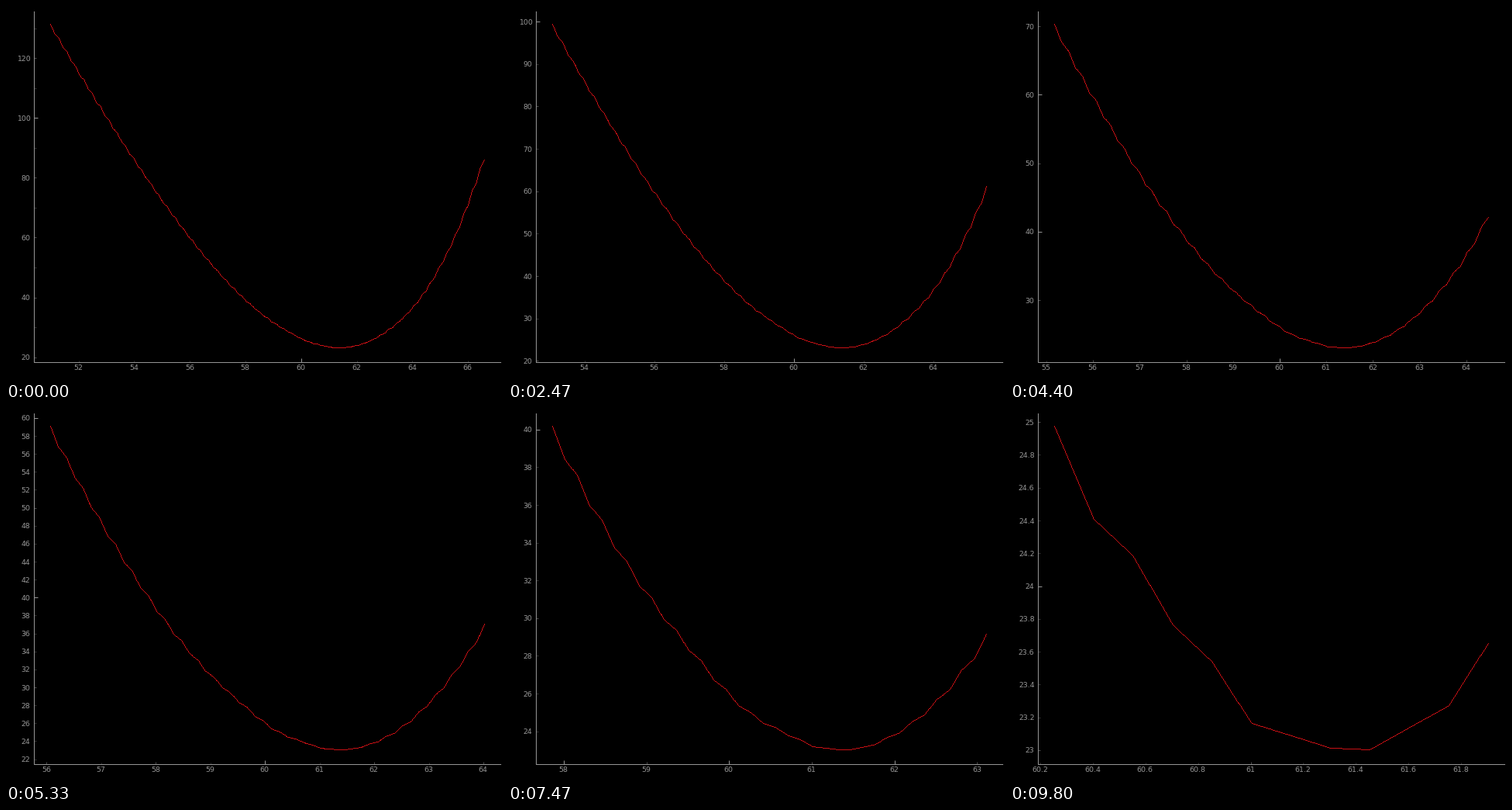
A matplotlib script for the animation above (9.87 s loop, 640 by 482 pixels).

```python
import math

import matplotlib.pyplot as plt
import numpy as np
from matplotlib.animation import FuncAnimation
from matplotlib.collections import LineCollection

W, H, DPI = 640, 482, 100
LOOP_MS, INTERVAL = 9870, 30
PX = 72 / DPI  # one pixel in points

# view box and the area the curve fills inside it, in pixels
LEFT, RIGHT, TOP, BOTTOM = 36, 638, 7, 459
CURVE_L, CURVE_R, CURVE_T, CURVE_B = 57, 617, 24.5, 441

GREY = 150 / 255
CURVE_COLOR = "#c81014"

# the valley shape, given by a few points
KNOTS = np.array([
    (50.9, 131.1), (53.0, 99.2), (54.2, 82.2), (56.0, 59.0), (57.2, 45.8),
    (58.7, 33.0), (59.5, 28.26), (60.2, 24.97), (60.7, 23.76), (61.0, 23.16),
    (61.2, 23.05), (61.4, 23.0), (61.9, 23.65), (62.6, 26.15), (63.4, 31.4),
    (64.0, 37.0), (64.9, 49.7), (65.5, 61.0), (66.5, 85.7),
]).T


def smooth(x):
    """Cubic Hermite curve through the knots."""
    kx, ky = KNOTS
    slope = np.gradient(ky, kx)
    i = np.clip(np.searchsorted(kx, x, side="right") - 1, 0, len(kx) - 2)
    h = kx[i + 1] - kx[i]
    t = (x - kx[i]) / h
    blend = t * t * (3 - 2 * t)
    bend = t * (1 - t) * ((1 - t) * slope[i] - t * slope[i + 1])
    return ky[i] + (ky[i + 1] - ky[i]) * blend + h * bend


# heights are read at x cut to one decimal, which makes the line uneven
X = 50.95 + 0.15 * np.arange(105)
Y = smooth(np.floor(X * 10 + 1e-6) / 10)


def step_at(ms):
    """Steps done so far; the pace drifts slightly over the loop."""
    pace = np.interp(ms, [0, 330, 2520, 6510, 9750], [0, 1, 8, 21, 31])
    return int(pace + 1e-6)


def tick_levels(lo, hi, size):
    """Tick values for the coarse, middle and fine spacing."""
    span = hi - lo
    best = span / math.log(size)
    unit = 10 ** math.floor(math.log10(best))
    steps = [unit * k for k in (1, 2, 10, 20, 100)]
    i = 0
    while steps[i + 1] <= best:
        i += 1
    spacings = [steps[i + 2], steps[i + 1]]
    if span / steps[i] <= 21:
        spacings.append(steps[i])
    seen, levels = set(), []
    for s in spacings:
        ks = range(math.ceil(lo / s), math.floor(hi / s) + 1)
        values = [v for v in (round(k * s, 6) for k in ks) if v not in seen]
        seen.update(values)
        levels.append(values)
    return levels


def visible_labels(levels, size, extent):
    """Add labels level by level until the axis gets too crowded."""
    shown = []
    for i, values in enumerate(levels):
        limit = 0.8 - 0.2 * min(len(shown) // 2, 3)
        fill = sum(extent(f"{v:g}") for v in shown + values) / size
        if i > 0 and fill >= limit:
            break
        shown += values
    return shown


def text_width(s):
    return sum(3 if c == "." else 5 for c in s)


def text_height(s):
    return 8.8


def pixel_line(xs, ys):
    """Whole-pixel points of a jagged line one pixel wide."""
    parts = []
    for x0, y0, x1, y1 in zip(xs, ys, xs[1:], ys[1:]):
        n = math.ceil(max(abs(x1 - x0), abs(y1 - y0))) + 1
        parts.append([np.linspace(x0, x1, n), np.linspace(y0, y1, n)])
    return np.round(np.hstack(parts))


fig = plt.figure(figsize=(W / DPI, H / DPI), dpi=DPI, facecolor="black")
ax = fig.add_axes([0, 0, 1, 1])
ax.set_xlim(0, W)
ax.set_ylim(H, 0)
ax.axis("off")

curve, = ax.plot([], [], ",", color=CURVE_COLOR)
line_width = 0.99 * PX
ticks = LineCollection([], linewidths=line_width, snap=True)
ax.add_collection(ticks)
ax.plot([LEFT, LEFT, RIGHT], [TOP, BOTTOM, BOTTOM], color=(GREY,) * 3,
        lw=line_width, snap=True)

labels = [ax.text(0, 0, "", color=(GREY,) * 3, family="DejaVu Sans",
                  fontsize=9.4 * PX, va="baseline") for _ in range(50)]
state = {"step": None}


def draw_step(step):
    xs = X[2 * step:len(X) - step]
    ys = Y[2 * step:len(X) - step]
    x0, x1, y0, y1 = xs[0], xs[-1], ys.min(), ys.max()
    kx = (CURVE_R - CURVE_L) / (x1 - x0)
    ky = (CURVE_B - CURVE_T) / (y1 - y0)

    def px(v):
        return CURVE_L + (v - x0) * kx

    def py(v):
        return CURVE_B - (v - y0) * ky

    curve.set_data(pixel_line(px(xs), py(ys)) + 0.25)

    width, height = RIGHT - LEFT, BOTTOM - TOP
    x_levels = tick_levels(x0 - (CURVE_L - LEFT) / kx,
                           x1 + (RIGHT - CURVE_R) / kx, width)
    y_levels = tick_levels(y0 - (BOTTOM - CURVE_B) / ky,
                           y1 + (CURVE_T - TOP) / ky, height)

    # finer ticks are shorter and dimmer
    segments, colors = [], []
    for levels, is_x in ((x_levels, True), (y_levels, False)):
        for i, values in enumerate(levels):
            length = 5 / (1 + i / 2)
            for v in values:
                if is_x:
                    p = round(px(v) - 1)
                    seg = [(p, BOTTOM), (p, BOTTOM - length)]
                else:
                    p = round(py(v))
                    seg = [(LEFT, p), (LEFT + length, p)]
                segments.append(seg)
                colors.append((GREY, GREY, GREY, 1 / (i + 1)))
    ticks.set_segments(segments)
    ticks.set_color(colors)

    specs = [(px(v) - 1.5, 469, v, "center")
             for v in visible_labels(x_levels, width, text_width)]
    specs += [(31.5, py(v) + 3.5, v, "right")
              for v in visible_labels(y_levels, height, text_height)]
    for label in labels:
        label.set_visible(False)
    for label, (x, y, v, ha) in zip(labels, specs):
        label.set_position((x, y))
        label.set_text(f"{v:g}")
        label.set_ha(ha)
        label.set_visible(True)


def update(frame):
    step = step_at(frame * INTERVAL)
    if step != state["step"]:
        draw_step(step)
        state["step"] = step
    return [curve, ticks, *labels]


def init():
    state["step"] = None
    return update(0)


anim = FuncAnimation(fig, update, frames=LOOP_MS // INTERVAL, init_func=init,
                     interval=INTERVAL, repeat=True, repeat_delay=0,
                     blit=False)
plt.show()
```
